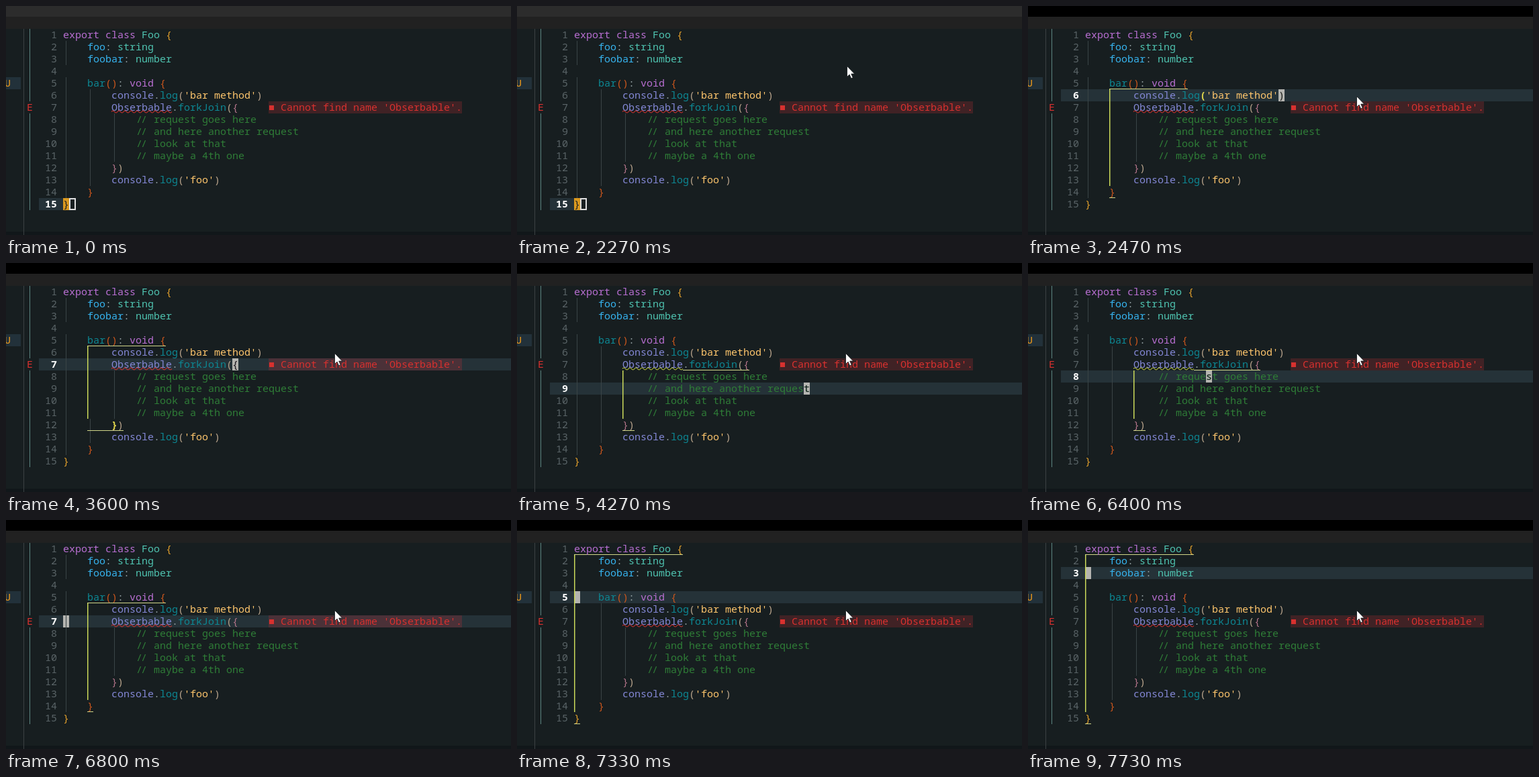
An HTML page for the animation above (8000 ms loop, 752 by 341 pixels).

```html
<!DOCTYPE html>
<html lang="en">
<head>
<meta charset="utf-8">
<title>Editor scope highlight</title>
<style>
  html, body { margin: 0; width: 100%; height: 100%; overflow: hidden; background: #171e20; }
  svg { display: block; width: 752px; height: 341px; }
  text { font: 15px "Noto Sans Mono", "DejaVu Sans Mono", monospace; white-space: pre; }
  .bold { font-weight: 700; }
  .p { fill: #b96fd2; } .t { fill: #4fc3b0; } .o { fill: #e2a02c; } .c { fill: #36b3ee; }
  .g { fill: #97a3a6; } .f { fill: #0d8793; } .r { fill: #cc571d; } .v { fill: #8488d6; }
  .n { fill: #b9a48c; } .s { fill: #fdc56c; } .k { fill: #b3748a; } .m { fill: #2f7d37; }
  .guide { fill: #3a4446; }
  .num { fill: #5a6467; }
  .num.bold { fill: #fff; }
  .err { fill: #d8312f; }
</style>
</head>
<body>
<svg id="stage" viewBox="0 0 752 341"></svg>
<script>
const LOOP = 8000, CELL = 9, LINE = 18, LEFT = 85, TOP = 34;

// Each line: indent, then tokens as "class:text".
const code = [
  [0, 'p:export class ', 't:Foo ', 'o:{'],
  [4, 'c:foo', 'g:: ', 't:string'],
  [4, 'c:foobar', 'g:: ', 't:number'],
  [0],
  [4, 'f:bar', 'r:()', 'g:: ', 'p:void ', 'r:{'],
  [8, 'v:console', 'g:.', 'f:log', 'n:(', "s:'bar method'", 'n:)'],
  [8, 'v:Obserbable', 'g:.', 'f:forkJoin', 'n:(', 'k:{'],
  [12, 'm://', 'm: request goes here'],
  [12, 'm://', 'm: and here another request'],
  [12, 'm://', 'm: look at that'],
  [12, 'm://', 'm: maybe a 4th one'],
  [8, 'k:}', 'n:)'],
  [8, 'v:console', 'g:.', 'f:log', 'n:(', "s:'foo'", 'n:)'],
  [4, 'r:}'],
  [0, 'o:}']
];
const plain = code.map(([indent, ...tokens]) =>
  ' '.repeat(indent) + tokens.map(t => t.slice(2)).join(''));

// Indent guides: column, first row, last row.
const guides = [[0, 2, 3], [0, 5, 14], [4, 6, 13], [8, 8, 11]];

// Scopes: column, opening row, closing row.
const scopes = { cls: [0, 1, 15], bar: [4, 5, 14], part: [4, 5, 12], fork: [8, 7, 12] };

// Caret: time, row, column, scope, matching bracket.
const carets = [
  [2470, 6, 32, 'bar', [6, 19]],
  [3600, 7, 28, 'part', [12, 8]],
  [3930, 8, 31, 'fork'],
  [4270, 9, 38, 'fork'],
  [4670, 8, 31, 'fork'],
  [5000, 8, 30, 'fork'],
  [5530, 8, 29, 'fork'],
  [5600, 8, 27, 'fork'],
  [5670, 8, 24, 'fork'],
  [5730, 8, 22, 'fork'],
  [5870, 8, 21, 'fork'],
  [6400, 8, 20, 'fork'],
  [6470, 8, 17, 'fork'],
  [6530, 8, 14, 'fork'],
  [6600, 8, 10, 'fork'],
  [6670, 8, 6, 'fork'],
  [6730, 8, 0, 'fork'],
  [6800, 7, 0, 'bar'],
  [7070, 6, 0, 'bar'],
  [7330, 5, 0, 'cls'],
  [7530, 4, 0, 'cls'],
  [7730, 3, 0, 'cls']
];

// Pointer: time, x, y.
const pointer = [
  [130, 741, -6], [200, 597, 44], [2270, 491, 89], [2330, 489, 127], [2400, 489, 134]
];
const FOCUS = 2400;

const colX = col => LEFT + col * CELL;
const rowY = row => TOP + (row - 1) * LINE;
const rect = (x, y, w, h, fill, extra = '') =>
  `<rect x="${x}" y="${y}" width="${w}" height="${h}" fill="${fill}" ${extra}/>`;
const esc = s => s.replace(/&/g, '&amp;').replace(/</g, '&lt;');
const text = (x, row, str, cls, extra = '') =>
  `<text x="${x}" y="${rowY(row) + 14}" class="${cls}" ${extra}>${esc(str)}</text>`;
const charAt = (row, col) => plain[row - 1][col] || ' ';
const latest = (list, t) => list.filter(item => item[0] <= t).pop();

function drawCode() {
  return code.map(([indent, ...tokens], i) => {
    let col = indent;
    return tokens.map(token => {
      const cls = token[0], str = token.slice(2), x = colX(col);
      col += str.length;
      return str === '//'
        ? text(x + 1, i + 1, str, cls, 'letter-spacing="-2"')
        : text(x, i + 1, str, cls);
    }).join('');
  }).join('');
}

function drawNumbers(current) {
  return code.map((_, i) => {
    const label = String(i + 1).padStart(2);
    return text(58, i + 1, label, i + 1 === current ? 'num bold' : 'num');
  }).join('');
}

function drawGuides(scope) {
  return guides.map(([col, first, last]) => {
    let out = '';
    for (let row = first; row <= last; row++) {
      const hidden = scope && col === scope[0] && row > scope[1] && row < scope[2];
      if (!hidden) out += rect(colX(col) + 4, rowY(row), 1, LINE, '#3a4446');
    }
    return out;
  }).join('');
}

function drawScope(scope) {
  if (!scope) return '';
  const [col, open, close] = scope;
  const under = (row, from) =>
    rect(colX(from), rowY(row + 1) - 1, (plain[row - 1].length - from) * CELL, 1, '#d0d588');
  return under(open, open === 7 ? 18 : col) + under(close, col) +
    rect(colX(col), rowY(open + 1), 1.5, (close - open - 1) * LINE, '#cbd95a');
}

function drawCurl(color) {
  let d = `M${colX(8)} 157.5`;
  for (let i = 0; i < 10; i++) d += 'q2.25 -3 4.5 0t4.5 0';
  return `<path d="${d}" fill="none" stroke="${color}" stroke-width="1.1"/>`;
}

function drawError() {
  return rect(391, rowY(7), 32 * CELL, LINE, '#d83038', 'fill-opacity=".21"') +
    rect(392, 148, 7, 7, '#d8312f') +
    text(409, 7, "Cannot find name 'Obserbable'.", 'err');
}

function drawFrame() {
  return rect(0, 16, 752, 18, '#212121') +
    rect(0, 336, 752, 5, '#11171a') +
    rect(26, 34, 1, 307, '#3b4143') +
    rect(35, 34, 1, 108, '#5b8481') + rect(35, 160, 1, 144, '#5b8481') +
    rect(0, 106, 22, 18, '#22313a') +
    text(-2, 5, 'U', 'o', 'font-style="italic" style="fill:#f09a1a"') +
    text(31, 7, 'E', 'err');
}

const backdrop = drawFrame(), codeText = drawCode(), errorText = drawError();

function drawPointer(spot) {
  if (!spot) return '';
  return `<path transform="translate(${spot[1]} ${spot[2]})" fill="#fff" stroke="#14191b"
    stroke-width=".8" d="M.5 .5V16.5L4.1 13.1L6.6 18.8L9.2 17.7L6.7 12.1H11.6Z"/>`;
}

function draw(t) {
  const caret = latest(carets, t);
  const [, row, col, scopeName, match] = caret || [0, 15, 1];
  const scope = scopes[scopeName];
  const x = colX(col), y = rowY(row);

  let under = rect(0, 0, 752, 16, t < FOCUS ? '#2c2c2c' : '#000') +
    rect(49, y, caret ? 703 : 36, LINE, '#253238');
  let over = '';
  if (caret) {
    under += rect(x, y, CELL, LINE, '#b4b4b0');
    over += text(x, row, charAt(row, col), '', 'fill="#171e20"');
  } else {
    under += rect(LEFT, y, CELL, LINE, '#d9981f');
    over += text(LEFT, row, '}', '', 'fill="#171e20"') +
      rect(x + 1, y + 1, CELL - 1, LINE - 2, 'none', 'stroke="#dedede" stroke-width="2"');
  }
  if (match) over += text(colX(match[1]), match[0], charAt(...match), 'bold', 'fill="#dcd548"');

  return backdrop + under + drawGuides(scope) + drawScope(scope) + drawNumbers(row) +
    errorText + codeText + drawCurl(scopeName === 'fork' ? '#c3cf3e' : '#d8312f') +
    over + drawPointer(latest(pointer, t));
}

const stage = document.getElementById('stage');
const start = performance.now();
let shown = '';

function tick() {
  const picture = draw((performance.now() - start) % LOOP);
  if (picture !== shown) stage.innerHTML = shown = picture;
  requestAnimationFrame(tick);
}
tick();
</script>
</body>
</html>
```
